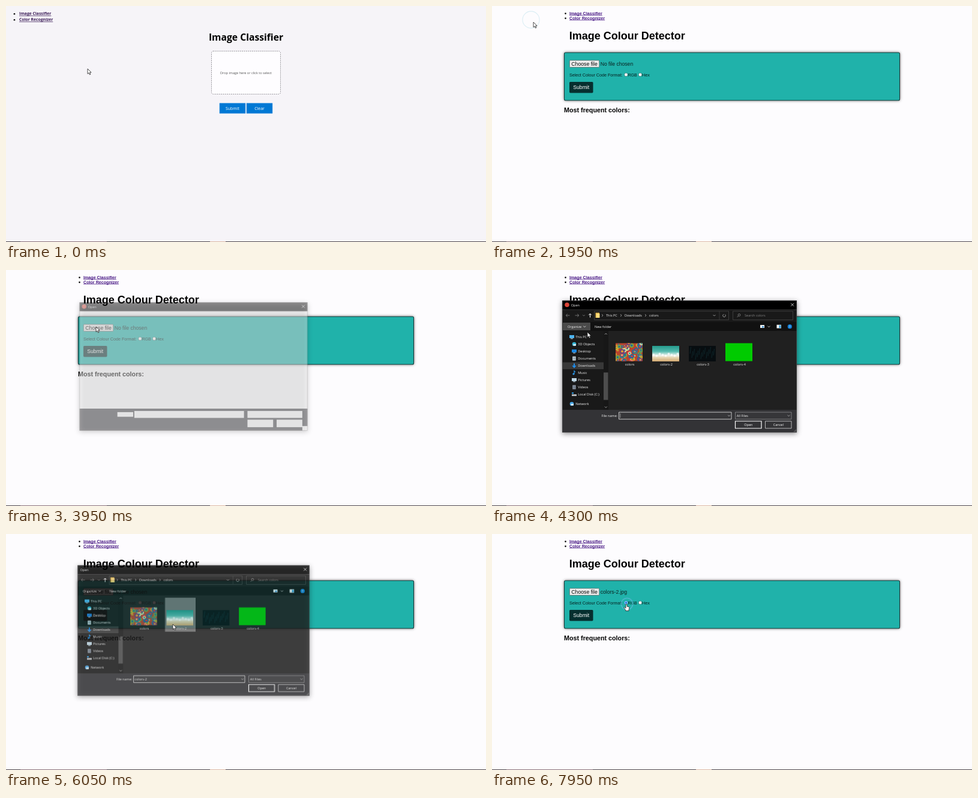
Animation of 800x395 px, one loop 8 s. Source, as an HTML page with a canvas:

```html
<!DOCTYPE html>
<html lang="en">
<head>
<meta charset="utf-8">
<title>Image tools</title>
<style>
html, body { margin: 0; width: 100%; height: 100%; overflow: hidden; background: #fdfcfe; }
canvas { display: block; }
</style>
</head>
<body>
<canvas id="stage" width="800" height="395"></canvas>
<script>
const LOOP = 8000, STEP = 50;
const SANS = '"Open Sans", "Noto Sans", sans-serif';
const ARIAL = '"Liberation Sans", Arial, sans-serif';
const main = document.getElementById('stage').getContext('2d');
const layer = document.createElement('canvas');
layer.width = 800;
layer.height = 395;
const dlg = layer.getContext('2d');

// time, x, y of the pointer tip
const PATH = [
  [0, 136, 105], [850, 66, 24], [900, 66, 22], [1400, 65, 22], [1700, 65, 23],
  [1950, 69, 27], [2550, 177, 92], [2600, 178, 94], [2850, 178, 94], [3100, 183, 107],
  [3400, 166, 84], [3700, 172, 94], [3750, 150, 95], [3950, 150, 95], [4150, 159, 104],
  [4400, 159, 104], [5250, 278, 151], [6750, 278, 151], [6800, 264, 143], [7500, 224, 117]
];
// time, x, y, end time, start and end angle
const CLICKS = [
  [1600, 65, 23, 2050, 0, Math.PI * 2],
  [6450, 277.5, 150.5, 7150, -0.1, 2.9],
  [7850, 225, 117, 8300, 0, Math.PI * 2]
];

const clamp = v => Math.max(0, Math.min(1, v));
const smooth = v => v * v * (3 - 2 * v);

function box(c, x, y, w, h, fill, stroke, lw = 0.7, r = 0) {
  c.beginPath();
  c.roundRect(x, y, w, h, r);
  if (fill) { c.fillStyle = fill; c.fill(); }
  if (stroke) { c.strokeStyle = stroke; c.lineWidth = lw; c.stroke(); }
}

function dot(c, x, y, r, fill) {
  c.beginPath();
  c.arc(x, y, r, 0, Math.PI * 2);
  c.fillStyle = fill;
  c.fill();
}

function line(c, pts, color, lw = 0.7) {
  c.beginPath();
  for (let i = 0; i < pts.length; i += 2) c.lineTo(pts[i], pts[i + 1]);
  c.strokeStyle = color;
  c.lineWidth = lw;
  c.stroke();
}

function text(c, s, x, y, size, color, font = SANS, weight = 400, align = 'left') {
  c.font = `${weight} ${size}px ${font}`;
  c.textAlign = align;
  c.fillStyle = color;
  c.fillText(s, x, y);
}

function links(x, y, gap, size, font, color, bullet) {
  ['Image Classifier', 'Color Recognizer'].forEach((s, i) => {
    const base = y + i * gap;
    dot(main, bullet, base - 2, 1.3, '#000');
    text(main, s, x, base, size, color, font, 700);
    main.fillRect(x, base + 0.8, main.measureText(s).width, 0.7);
  });
}

function taskbar() {
  main.fillStyle = '#4c454a';
  main.fillRect(0, 394, 800, 1);
  main.fillStyle = '#8a7078';
  main.fillRect(24, 394, 144, 1);
  main.fillStyle = '#dcb8a4';
  main.fillRect(340, 394, 26, 1);
}

function classifier() {
  main.fillStyle = '#f6f4f8';
  main.fillRect(0, 0, 800, 395);
  links(22, 15.2, 10, 6.75, SANS, '#3b1c58', 14);
  text(main, 'Image Classifier', 400, 58, 15.7, '#000', SANS, 700, 'center');
  main.setLineDash([2, 1.4]);
  box(main, 342.5, 75.5, 115, 72, '#fefdff', '#8c8a90', 0.9, 3);
  main.setLineDash([]);
  text(main, 'Drop image here or click to select', 400, 114, 5.55, '#555', SANS, 400, 'center');
  [['Submit', 356], ['Clear', 401]].forEach(([s, x]) => {
    box(main, x, 162.7, 43, 17, '#0078d4', '#2b90e0', 0.5);
    text(main, s, x + 21.5, 174, 6.9, '#fff', SANS, 400, 'center');
  });
}

function radio(x, on) {
  dot(main, x, 115, 2.9, on ? '#0b6fe0' : '#4b6d6c');
  dot(main, x, 115, 2.4, '#fff');
  if (on) dot(main, x, 115, 1.7, '#0b6fe0');
}

function detector(t) {
  main.fillStyle = '#fdfcfe';
  main.fillRect(0, 0, 800, 395);
  links(129, 14.6, 8, 7.15, ARIAL, '#4a1a86', 122.5);
  text(main, 'Image Colour Detector', 128.7, 56, 18, '#000', ARIAL, 700);

  main.save();
  main.shadowColor = 'rgba(0,0,0,.65)';
  main.shadowBlur = 5;
  box(main, 120.5, 78, 559, 80, '#20b2aa', null, 0, 2);
  main.restore();
  box(main, 120.5, 78, 559, 80, null, '#163c3b', 1.1, 2);

  const hover = t >= 2600 && t < 4000;
  box(main, 129.3, 91, 49.4, 11.6, hover ? '#e5e5e5' : '#efefef', '#5c6766', 0.8, 1);
  text(main, 'Choose file', 132.3, 100, 8.7, '#000', ARIAL);
  text(main, t < 6200 ? 'No file chosen' : 'colors-2.jpg', 180.7, 100, 8.6, '#0a2220', ARIAL);
  text(main, 'Select Colour Code Format:', 129, 118, 7.15, '#06201f', ARIAL);
  radio(223.4, t >= 7850);
  text(main, 'RGB', 226.4, 118, 7.15, '#06201f', ARIAL);
  radio(247, false);
  text(main, 'Hex', 250, 118, 7.15, '#06201f', ARIAL);
  box(main, 129, 127, 39.5, 18.4, '#062f2f', null, 0, 1.6);
  text(main, 'Submit', 135.3, 139.2, 8.65, '#fff', ARIAL);
  text(main, 'Most frequent colors:', 120, 177.5, 10.75, '#000', ARIAL, 700);
}

function chevron(x, y, dx, dy, color = '#ccc') {
  line(dlg, dx ? [x - dx, y - 2, x + dx, y, x - dx, y + 2] : [x - 2, y - dy, x, y + dy, x + 2, y - dy], color);
}

function label(s, x, y, color = '#f2f2f2', align = 'left') {
  text(dlg, s, x, y, 5.55, color, SANS, 400, align);
}

function titleBar(icon) {
  dlg.fillStyle = '#000';
  dlg.fillRect(117, 51, 391, 15.5);
  if (icon) dot(dlg, 125, 58.3, 3.8, '#db4437');
  label('Open', icon ? 131.7 : 121.5, 60.5);
  line(dlg, [498.2, 55.7, 503, 60.5], '#fff', 0.8);
  line(dlg, [503, 55.7, 498.2, 60.5], '#fff', 0.8);
}

function blankBody() {
  dlg.fillStyle = '#fff';
  dlg.fillRect(117, 66.5, 391, 167.5);
  dlg.fillStyle = '#303033';
  dlg.fillRect(117, 234, 391, 38);
  dlg.fillStyle = '#fff';
  [[182, 240, 27, 8], [211, 238, 188, 12], [405, 238, 94, 12],
   [405, 253, 44, 13], [455, 253, 44, 13], [499, 264, 9, 8]].forEach(r => dlg.fillRect(...r));
}

function navRow() {
  dlg.fillStyle = '#191919';
  dlg.fillRect(117, 66.5, 391, 20.5);
  const arrow = (x, d, c) => {
    line(dlg, [x - 3, 76, x + 3, 76], c);
    line(dlg, [x + d, 73.5, x + 3 * d, 76, x + d, 78.5], c);
  };
  arrow(126.5, -1, '#999');
  arrow(141.5, 1, '#999');
  chevron(153, 76, 0, 0.9, '#888');
  line(dlg, [163.5, 79.5, 163.5, 73], '#fff', 1);
  line(dlg, [161, 75.5, 163.5, 73, 166, 75.5], '#fff', 1);
  box(dlg, 170.5, 69, 224, 14.5, null, '#4c4c4c', 0.7);
  box(dlg, 172.5, 71.5, 6.5, 8.5, '#e6b94c');
  box(dlg, 174, 73, 5.5, 7, '#ffdc7d');
  [184, 215, 256].forEach(x => chevron(x, 76, 0.8, 0));
  label('This PC', 190, 78);
  label('Downloads', 221, 78);
  label('colors', 262, 78);
  chevron(370.5, 76, 0, 1);
  line(dlg, [379, 69, 379, 83.5], '#444');
  dlg.beginPath();
  dlg.arc(387, 76.3, 2.3, -0.9, 4.4);
  dlg.strokeStyle = '#ccc';
  dlg.stroke();
  box(dlg, 401.5, 69, 100, 14.5, null, '#4c4c4c', 0.7);
  dlg.beginPath();
  dlg.arc(412, 75.3, 1.9, 0, 7);
  dlg.strokeStyle = '#999';
  dlg.stroke();
  line(dlg, [410.6, 76.7, 408.6, 79], '#999');
  label('Search colors', 421, 78, '#858585');
}

function toolbar(hot) {
  dlg.fillStyle = '#111';
  dlg.fillRect(117, 87, 391, 15);
  if (hot) box(dlg, 118, 88, 46, 13, '#4a4a4a');
  label('Organize', 126, 96.5);
  chevron(154.3, 94.7, 0, 0.8, '#fff');
  label('New folder', 171, 96.5);
  box(dlg, 447, 92, 7, 5, '#e8eef2');
  box(dlg, 450, 94, 3, 2.4, '#3b8ed0');
  chevron(461.5, 94.7, 0, 0.8, '#fff');
  box(dlg, 474.5, 91.7, 7.5, 5.8, '#f2f2f2');
  box(dlg, 478.5, 92.5, 3, 4.4, '#2d9bd8');
  dot(dlg, 496.3, 94.7, 3.6, '#1480d8');
  label('?', 496.3, 96.7, '#fff', 'center');
}

const PLACES = [
  ['This PC', 0, '#4db4f0'], ['3D Objects', 4, '#35b6d6'], ['Desktop', 4, '#1a86e0'],
  ['Documents', 4, '#c9d5dc'], ['Downloads', 4, '#1f8ff0'], ['Music', 4, '#2a9df4'],
  ['Pictures', 4, '#bfd8e6'], ['Videos', 4, '#8b93a0'], ['Local Disk (C:)', 4, '#b4b8bc'],
  ['Network', 0, '#4aa8e8']
];

function placeIcon(name, x, y, color) {
  if (name === 'Downloads') {
    line(dlg, [x + 4, y - 3.4, x + 4, y + 2], color, 2);
    line(dlg, [x + 1.2, y, x + 4, y + 3, x + 6.8, y], color, 1.6);
  } else if (name === 'Music') {
    line(dlg, [x + 4, y + 2, x + 4, y - 3.2, x + 6, y - 1], color, 1.1);
    dot(dlg, x + 2.9, y + 2, 1.6, color);
  } else if (name === '3D Objects' || name === 'Network') {
    dot(dlg, x + 4, y, 3.3, color);
    box(dlg, x + 2.5, y, 4.5, 2.8, '#d9eef6');
  } else if (name === 'Documents' || name === 'Videos') {
    box(dlg, x + 1.2, y - 3.3, 5.5, 6.8, color);
    line(dlg, [x + 2.3, y - 1, x + 5.7, y - 1], '#405868');
    line(dlg, [x + 2.3, y + 1, x + 5.7, y + 1], '#405868');
  } else if (name === 'Local Disk (C:)') {
    box(dlg, x, y, 8, 3, color);
    box(dlg, x, y - 3, 3, 2, '#2da0ee');
  } else {
    box(dlg, x, y - 3, 8, 5, color);
    box(dlg, x + 2, y + 2.4, 4, 1, '#cfe4f0');
  }
}

function sidebar() {
  dlg.fillStyle = '#191919';
  dlg.fillRect(117, 102, 77, 132);
  box(dlg, 117.5, 154.5, 68.5, 11.5, '#383838');
  PLACES.forEach(([name, indent, color], i) => {
    const y = i === 9 ? 224 : 112 + i * 12;
    placeIcon(name, 129 + indent, y, color);
    label(name, 139.3 + indent, y + 2);
  });
  dlg.fillStyle = '#171717';
  dlg.fillRect(186, 102, 7.5, 132);
  dlg.fillStyle = '#4d4d4d';
  dlg.fillRect(186, 171.5, 7.5, 46);
  chevron(189.8, 107, 0, -1);
  chevron(189.8, 229.5, 0, 1);
}

function thumbs() {
  dlg.save();
  dlg.beginPath();
  dlg.rect(206, 122.5, 45, 30);
  dlg.clip();
  dlg.fillStyle = '#b9452c';
  dlg.fillRect(206, 122, 45, 31);
  const hues = ['#e8a02c', '#2f8f8a', '#d23a3f', '#7ba83c', '#6d3f7c', '#e8d9a0', '#246a9c'];
  let seed = 7;
  const rnd = () => (seed = seed * 16807 % 2147483647) / 2147483647;
  for (let i = 0; i < 75; i++) {
    const x = 206 + rnd() * 45, y = 122 + rnd() * 31, r = 1.3 + rnd() * 2.6;
    dot(dlg, x, y, r, hues[i % 7]);
    dot(dlg, x, y, r * 0.5, hues[(i + 3) % 7]);
  }
  dlg.restore();

  const sea = dlg.createLinearGradient(0, 127, 0, 153);
  [[0, '#249a8c'], [0.35, '#53b9ad'], [0.5, '#a9dcd4'], [0.62, '#f4f4ee'], [0.74, '#e6d6b4'], [1, '#d2a970']]
    .forEach(s => sea.addColorStop(...s));
  box(dlg, 267, 127, 45, 26, sea);
  for (let i = 0; i < 9; i++) dot(dlg, 269.5 + i * 5, 142 + Math.sin(i * 2.1) * 1.8, 1.9, 'rgba(255,255,255,.7)');

  box(dlg, 328, 127, 45, 26, '#070d10');
  for (let i = 0; i < 14; i++) {
    const x = 330 + i * 3, y = 129 + (i * 7) % 11;
    line(dlg, [x + 1.5, y, x, y + 11], '#123237', 0.7);
  }
  box(dlg, 389, 122.5, 45, 30, '#00cb00');
}

function files(t) {
  dlg.fillStyle = '#202020';
  dlg.fillRect(194, 102, 314, 132);
  if (t >= 5300) box(dlg, 264.5, 106, 51.5, 57.5, '#777');
  else if (t >= 5150) box(dlg, 264.5, 106, 51.5, 57.5, '#4d4d4d');
  thumbs();
  ['colors', 'colors-2', 'colors-3', 'colors-4'].forEach((s, i) =>
    label(s, 229.5 + i * 61, 160.3, '#f2f2f2', 'center'));
}

function footer(t) {
  dlg.fillStyle = '#333336';
  dlg.fillRect(117, 234, 391, 38);
  label('File name:', 209, 246, '#f2f2f2', 'right');
  box(dlg, 211.5, 238, 187.5, 11.7, '#363639', '#d8d8d8', 0.9);
  if (t >= 5300) label('colors-2', 213.3, 246);
  else line(dlg, [213.8, 240, 213.8, 247.5], '#ddd', 0.6);
  chevron(395, 243.8, 0, 0.9);
  box(dlg, 405.5, 238, 93.5, 11.7, '#363639', '#8d8d90', 0.8);
  label('All Files', 407.7, 246);
  chevron(494.5, 243.8, 0, 0.9);
  box(dlg, 405.5, 253, 43.5, 12, '#333336', '#fff', 1.2);
  label('Open', 427.3, 261, '#fff', 'center');
  box(dlg, 455.5, 253, 43.5, 12, '#333336', '#c4c4c6', 0.9);
  label('Cancel', 477.3, 261, '#fff', 'center');
  for (let i = 0; i < 3; i++) line(dlg, [507 - i * 2, 271, 507, 271 - i * 2], '#999', 0.6);
}

function dialog(t) {
  if (t < 3950 || t >= 6200) return;
  let alpha = 1, scale = 1;
  if (t < 4200) {
    const rest = 0.59 * Math.exp(-(t - 3950) / 55);
    alpha = t < 4150 ? 1 - rest : 1;
    scale = 1 - 0.047 * rest * (t < 4150);
  } else if (t > 6000) {
    const k = (t - 6000) / 50;
    alpha = clamp([1, 0.78, 0.4, 0.12][k]);
    scale = 1 - 0.011 * k;
  }
  dlg.clearRect(0, 0, 800, 395);
  titleBar(t < 6000);
  if (t < 4300) {
    blankBody();
  } else {
    navRow();
    toolbar(t < 4500);
    sidebar();
    files(t);
    footer(t);
  }
  box(dlg, 117.3, 51.3, 390.4, 220.4, null, '#59595b', 0.6);

  main.save();
  main.globalAlpha = alpha;
  main.shadowColor = 'rgba(0,0,0,.45)';
  main.shadowBlur = 8;
  main.shadowOffsetY = 2;
  main.translate(312.4, 161);
  main.scale(scale, scale);
  main.translate(-312.4, -161);
  main.drawImage(layer, 0, 0);
  main.restore();
}

function rings(t) {
  CLICKS.forEach(([t0, x, y, end, from, to]) => {
    if (t < t0 || t >= end) return;
    const age = t - t0, grow = Math.exp(-age / 90);
    main.beginPath();
    main.arc(x, y, 14.3 * (1 - grow) + 0.1, from, to);
    main.strokeStyle = `rgba(85,185,210,${0.95 * (1 - age / (end - t0))})`;
    main.lineWidth = 1 + 2.4 * grow;
    main.stroke();
  });
}

function pointerAt(t) {
  let i = PATH.findIndex(p => p[0] > t);
  if (i < 0) return PATH[PATH.length - 1].slice(1);
  const [t0, x0, y0] = PATH[i - 1], [t1, x1, y1] = PATH[i];
  const k = smooth((t - t0) / (t1 - t0));
  return [x0 + (x1 - x0) * k, y0 + (y1 - y0) * k];
}

const ARROW = new Path2D('M0 0V8.6L2 6.8L3.4 10L4.9 9.3L3.5 6.2H6.1Z');
const HAND = new Path2D('M-1 0.8Q0 -.6 1 .8V4.2L4.2 5Q5 5.4 4.8 6.6L4 10V11.6H-1.4V10.2L-4 6.6Q-4 5.2 -2.6 5.8L-1 7.2Z');

function pointer(t) {
  const [x, y] = pointerAt(t);
  const hand = (t >= 900 && t < 1750) || t >= 7500;
  main.save();
  main.translate(x, y);
  main.fillStyle = '#fff';
  main.strokeStyle = '#222';
  main.lineWidth = 0.8;
  main.lineJoin = 'round';
  main.fill(hand ? HAND : ARROW);
  main.stroke(hand ? HAND : ARROW);
  main.restore();
}

function draw(now) {
  const t = Math.floor((now % LOOP) / STEP) * STEP;
  if (t < 1650) classifier();
  else detector(t);
  taskbar();
  dialog(t);
  rings(t);
  pointer(t);
}

const start = performance.now();
function tick() {
  draw(performance.now() - start);
  requestAnimationFrame(tick);
}
tick();
</script>
</body>
</html>
```
